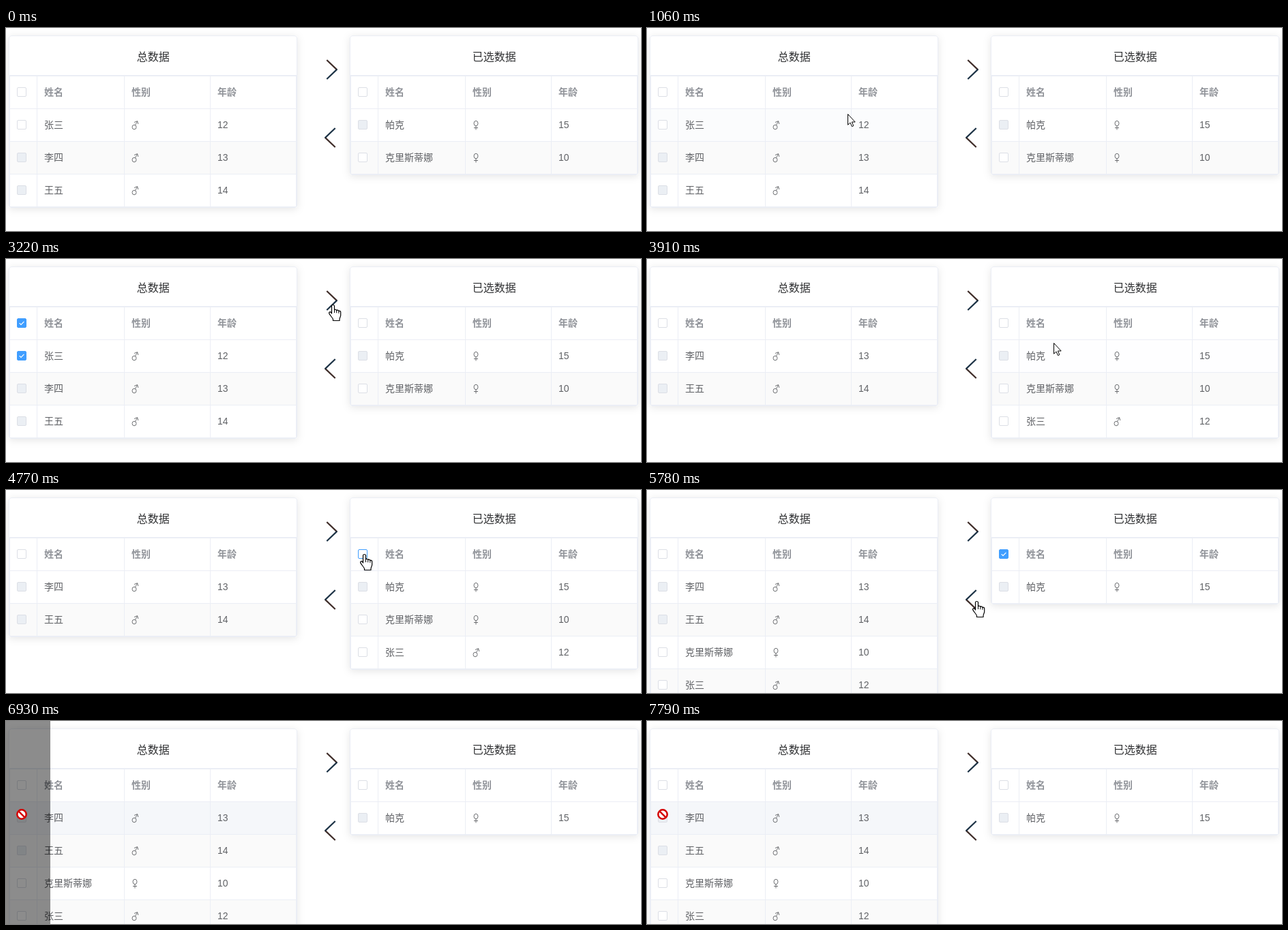
Recreate the animation shown at these times as an HTML page. Size 931 by 298 pixels, loop 8000 ms.

```html
<!DOCTYPE html>
<html lang="zh">
<head>
<meta charset="utf-8">
<style>
  html, body { margin: 0; width: 100%; height: 100%; overflow: hidden; background: #fff; }
  svg { display: block; width: 931px; height: 298px; }
  text { font: 14px "Liberation Sans", "Noto Sans CJK SC", "Noto Sans CJK", sans-serif; fill: #606266; }
  .title { font-size: 16px; fill: #303133; text-anchor: middle; }
  .head { font-weight: bold; fill: #909399; }
  .line { stroke: #ebeef5; fill: none; }
  .sign { stroke: #606266; stroke-width: .9; fill: none; }
  .up { stroke: #1d3346; }
  .down { stroke: #3f2d29; }
</style>
</head>
<body>
<svg viewBox="0 0 931 298">
  <defs>
    <filter id="shadow" x="-10%" y="-20%" width="120%" height="140%">
      <feDropShadow dx="0" dy="2" stdDeviation="6" flood-color="#000" flood-opacity=".1"/>
    </filter>
    <g id="angle">
      <path class="down" d="M0 -14L15 .4"/>
      <path class="up" d="M15 -.4L0 14"/>
    </g>
  </defs>
  <g id="tables"></g>
  <g stroke-width="2.2">
    <use href="#angle" x="470.3" y="61"/>
    <use href="#angle" transform="translate(482.7 161) rotate(180)"/>
  </g>
  <rect id="shade" height="298" fill-opacity=".45"/>
  <g id="pointer"></g>
</svg>
<script>
const LOOP = 8000, STEP = 77, START = 210, ROW = 48, HEAD_Y = 94, FADE = 250;
const CHECK_LEFT = 1815, MOVE_RIGHT = 3380, CHECK_RIGHT = 4930, MOVE_LEFT = 5640;
const UNCHECK = MOVE_LEFT + 190;
const CLICKS = [CHECK_LEFT, MOVE_RIGHT, CHECK_RIGHT, MOVE_LEFT, 7600, 7790];

const person = (name, sex, age, off) => ({ name, sex, age, off });
const zhang = person('张三', 'm', 12), li = person('李四', 'm', 13, true), wang = person('王五', 'm', 14, true);
const pa = person('帕克', 'f', 15, true), chris = person('克里斯蒂娜', 'f', 10);

// Pointer moves: when, how long, where to, and how far the path bends down
const entry = { x: 424, y: 262 };
const go = (at, dur, x, y, bend = 0) => ({ at, dur, x, y, bend });
const moves = [
  go(START, 430, 11, 90, -60),
  go(640, 490, 312, 128),
  go(1130, 430, 23, 139),
  go(1850, 120, 117, 138),
  go(2060, 840, 480, 67, 70),
  go(3600, 770, 813, 229),
  go(4370, 230, 526, HEAD_Y, -60),
  go(5100, 350, 484, 163),
  go(6060, 460, 24, 140, 75),
  go(6800, 100, 23, 137)
];

const $ = id => document.getElementById(id);
const clamp = v => Math.max(0, Math.min(1, v));
const ease = p => p * p * (3 - 2 * p);

function pointerAt(t) {
  let { x, y } = entry;
  for (const m of moves) {
    if (t < m.at) break;
    const p = ease(clamp((t - m.at) / m.dur));
    x += (m.x - x) * p;
    y += (m.y - y) * p + m.bend * Math.sin(Math.PI * p);
  }
  return [x, y];
}

// A dark panel peeks in from the left edge and slides away again
const shadeAt = t => 65 * Math.min(clamp((t - 6440) / 170), clamp((7300 - t) / 370));

function stateAt(t) {
  const moved = t >= MOVE_RIGHT, back = t >= MOVE_LEFT;
  const left = !moved ? [zhang, li, wang] : back ? [li, wang, chris, zhang] : [li, wang];
  const right = back ? [pa] : moved ? [pa, chris, zhang] : [pa, chris];
  return [
    { x: 0, title: '总数据', rows: left, on: moved ? 0 : t - CHECK_LEFT },
    { x: 500, title: '已选数据', rows: right, on: t < UNCHECK ? t - CHECK_RIGHT : 0 }
  ];
}

const rowY = i => HEAD_Y + ROW * (i + 1);

function rowHit(table, i, t) {
  if (t < START) return false;
  const [x, y] = pointerAt(t);
  return Math.abs(x - table.x - 215.5) < 210 && Math.abs(y - rowY(i)) < ROW / 2;
}

// The background fades, so average the recent hits
function hover(table, i, t) {
  const n = 10;
  let hits = 0;
  for (let k = 0; k < n; k++) hits += rowHit(table, i, t - k * FADE / n);
  return hits / n;
}

const overBox = (x, y, bx, by) => Math.abs(x - bx) <= 7.5 && Math.abs(y - by) <= 7.5;

function box(x, y, on, off, hot) {
  const p = !off && on > 0, s = clamp((on - 50) / 150);
  const fill = off ? '#ebeff4' : p ? '#409eff' : '#fff';
  const edge = !off && (p || hot) ? '#409eff' : '#dcdfe6';
  const mark = p && s ? `<path d="M-3.3 .2L-1 2.5L3.4 -2.2" transform="translate(${x} ${y}) scale(${s})" fill="none" stroke="#fff" stroke-width="1.2"/>` : '';
  return `<rect x="${x - 6.5}" y="${y - 6.5}" width="13" height="13" rx="1.5" fill="${fill}" stroke="${edge}"/>${mark}`;
}

const text = (x, y, s, cls = '') => `<text x="${x}" y="${y}" class="${cls}">${s}</text>`;

const signs = {
  m: 'M1 3.5a3 3.3 0 1 0 6 0a3 3.3 0 1 0 -6 0M5.5 .7L8.5 -5M4 -3.5L8.6 -5.4L9.8 -1',
  f: 'M2 -2a3 3.7 0 1 0 6 0a3 3.7 0 1 0 -6 0M5 1.7V7.5M2 4.5H8'
};
const sign = (sex, x, y) => `<path class="sign" d="${signs[sex]}" transform="translate(${x} ${y})"/>`;

const cols = [5.5, 45.5, 173.5, 299.5];
const cellX = i => cols[i] + 10.5;

function drawTable(table, t, px, py) {
  const { x, rows, on } = table, top = 118.5, bottom = top + rows.length * ROW;
  const hot = y => t >= START && overBox(px, py, x + 23, y);
  let s = `<rect x="${x + 4.5}" y="11.5" width="422" height="${bottom - 10.5}" rx="3.5" fill="#fff" stroke="#ebeef5" filter="url(#shadow)"/>`;
  s += text(x + 215.7, 47.5, table.title, 'title');
  rows.forEach((r, i) => {
    const y = rowY(i), h = hover(table, i, t), base = i % 2 ? 250 : 255;
    const mix = v => Math.round(base + (v - base) * h);
    s += `<rect x="${x + 6}" y="${y - 23}" width="419" height="47" fill="rgb(${mix(245)},${mix(247)},${mix(250)})"/>`;
    s += box(x + 23, y, on, r.off, hot(y));
    s += text(x + cellX(1), y + 5, r.name) + sign(r.sex, x + cellX(2), y) + text(x + cellX(3), y + 5, r.age);
  });
  s += box(x + 23, HEAD_Y, on, false, hot(HEAD_Y));
  ['姓名', '性别', '年龄'].forEach((h, i) => s += text(x + cellX(i + 1), HEAD_Y + 5, h, 'head'));
  const across = y => `M${x + 5} ${y}H${x + 426}`;
  let d = across(69.5) + across(70.5);
  for (let y = top; y <= bottom; y += ROW) d += across(y);
  for (const c of [...cols, 425.5]) d += `M${x + c} 70V${bottom}`;
  return s + `<path class="line" d="${d}"/>`;
}

const shapes = {
  arrow: '<path d="M.5 .5V16.2L4 12.9L6.5 18.6L8.8 17.6L6.4 12H11.2Z" fill="#fff" stroke="#000"/>',
  hand: '<path d="M-2.5 2C-2.5 0 1.5 0 1.5 2V8C2 6.8 4.6 7 4.7 8.6C5.4 7.5 7.8 7.9 7.9 9.6C8.7 8.8 10.7 9.2 10.7 11V15.5C10.7 18 9 19.5 9 21.5V23.5H-.5V21.5C-.5 20 -5.6 15 -6.3 12.8C-6.9 10.8 -4.5 10 -3.3 11.6L-2.5 13Z" fill="#fff" stroke="#000" stroke-width="1.2" stroke-linejoin="round"/><path d="M1.5 8V12M4.7 8.6V12.3M7.9 9.6V12.8" stroke="#000"/>',
  no: '<circle r="6.7" fill="#fff" stroke="#d40000" stroke-width="2.5"/><path d="M-4.6 -4.6L4.6 4.6" stroke="#d40000" stroke-width="2.5"/>'
};

function pointerKind(tables, x, y) {
  const overArrow = [61, 161].some(cy => Math.abs(x - 476.5) < 11 && Math.abs(y - cy) < 19);
  if (overArrow) return 'hand';
  for (const tb of tables) {
    if (overBox(x, y, tb.x + 23, HEAD_Y)) return 'hand';
    const row = tb.rows.find((r, i) => overBox(x, y, tb.x + 23, rowY(i)));
    if (row) return row.off ? 'no' : 'hand';
  }
  return 'arrow';
}

function render(now) {
  const raw = now % LOOP;
  const t = raw < START ? raw : START + Math.floor((raw - START) / STEP) * STEP;
  const tables = stateAt(t), [x, y] = pointerAt(t);
  $('tables').innerHTML = tables.map(tb => drawTable(tb, t, x, y)).join('');
  $('shade').setAttribute('width', shadeAt(t));
  const pressed = CLICKS.some(c => raw < c && raw >= c - 100);
  const ring = pressed ? '<circle r="12" fill="#ff0" fill-opacity=".47"/>' : '';
  $('pointer').innerHTML = raw < START ? '' :
    `<g transform="translate(${Math.round(x)} ${Math.round(y)})">${ring}${shapes[pointerKind(tables, x, y)]}</g>`;
}

const begin = performance.now();
function tick() {
  render(performance.now() - begin);
  requestAnimationFrame(tick);
}
tick();
</script>
</body>
</html>
```
